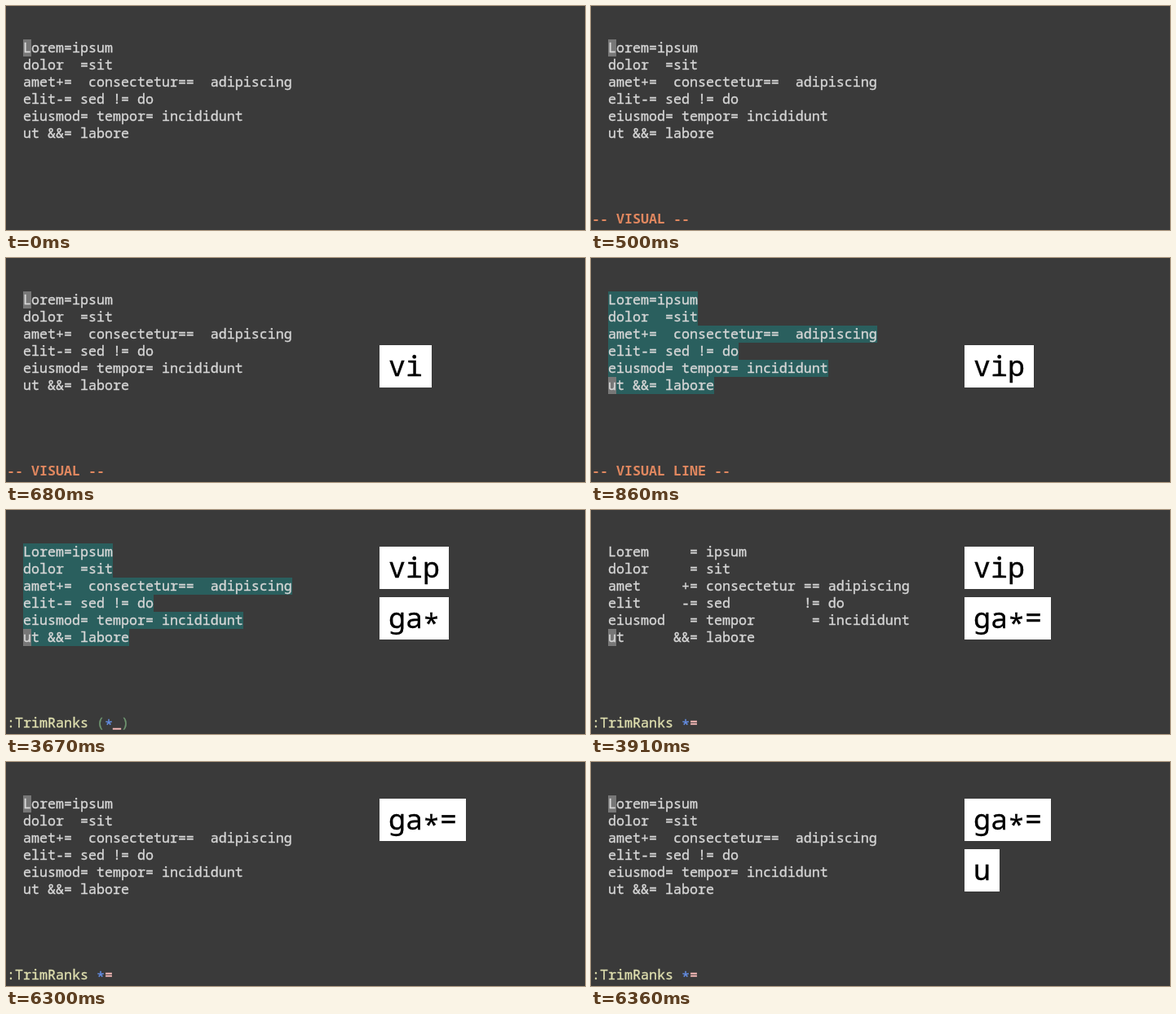
These frames come from a looping animation (710x275 px, 8 s). An HTML page:

```html
<!DOCTYPE html>
<html lang="en">
<head>
<meta charset="utf-8">
<title>Aligning text</title>
<style>
  html, body { margin: 0; width: 100%; height: 100%; overflow: hidden; background: #3a3a3a; }
  pre {
    position: absolute; margin: 0; color: #d6d6d6;
    font: 16.667px/21px "Noto Sans Mono", "DejaVu Sans Mono", monospace;
    font-variant-ligatures: none;
    -webkit-text-stroke: .35px;
  }
  #text { left: 21px; top: 40px; }
  #status { left: 1px; top: 250px; }
  .line { position: relative; isolation: isolate; display: block; width: max-content; height: 21px; }
  .line::before, .line::after { position: absolute; z-index: -1; left: 0; top: 1px; height: 21px; }
  .selected::before { content: ""; width: 100%; background: #2a5f5e; }
  .cursor::after { content: ""; width: 10px; background: #777; }
  .keys {
    left: 458px; height: 52px; padding: 0 11px; background: #fff; color: #000;
    font-size: 35px; line-height: 50px;
  }
  .star { position: relative; top: .2em; }
  .mode { color: #e0875f; font-weight: bold; -webkit-text-stroke: 0; }
  .command { color: #dfdfaf; }
  .paren { color: #719872; }
  .blue { color: #6590e8; }
  .pink { color: #ffbfbd; }
</style>
</head>
<body>
<pre id="text"></pre>
<pre id="status"></pre>
<pre class="keys" id="upper" style="top:45px"></pre>
<pre class="keys" id="lower" style="top:107px"></pre>
<script>
const $ = id => document.getElementById(id);
const span = (cls, s) => `<span class="${cls}">${s}</span>`;
const escapeHtml = s => s.replace(/&/g, "&amp;");

const raw = [
  "Lorem=ipsum",
  "dolor  =sit",
  "amet+=  consectetur==  adipiscing",
  "elit-= sed != do",
  "eiusmod= tempor= incididunt",
  "ut &&= labore"
];
const aligned = [
  "Lorem     = ipsum",
  "dolor     = sit",
  "amet     += consectetur == adipiscing",
  "elit     -= sed         != do",
  "eiusmod   = tempor       = incididunt",
  "ut      &&= labore"
];

const star = span("star", "*");
const command = args => span("command", ":TrimRanks ") + args;
const prompt = args => command(span("paren", "(") + args + span("paren", ")"));
const blank = span("pink", "_");
const mode = name => span("mode", `-- ${name} --`);

// Each step changes only the listed parts of the screen.
const steps = [
  [0, { lines: raw, cursor: 0, selected: false, status: "", upper: "", lower: "" }],
  [500, { status: mode("VISUAL") }],
  [560, { lower: "v" }],
  [680, { lower: "vi" }],
  [860, { lower: "vip", cursor: 5, selected: true, status: mode("VISUAL LINE") }],
  [3310, { upper: "vip", lower: "g" }],
  [3490, { lower: "ga", status: prompt(blank) }],
  [3670, { lower: "ga*", status: prompt(span("blue", star) + blank) }],
  [3910, { lower: "ga*=", lines: aligned, selected: false,
           status: command(span("blue", star) + span("pink", "=")) }],
  [6300, { lines: raw, cursor: 0, upper: "ga*=", lower: "" }],
  [6360, { lower: "u" }]
];

function showKeys(id, keys) {
  $(id).innerHTML = keys.replace("*", star);
  $(id).hidden = !keys;
}

function render(count) {
  const s = Object.assign({}, ...steps.slice(0, count).map(step => step[1]));
  $("text").innerHTML = s.lines.map((line, i) =>
    span("line" + (s.selected ? " selected" : "") + (i === s.cursor ? " cursor" : ""), escapeHtml(line))
  ).join("");
  $("status").innerHTML = s.status;
  showKeys("upper", s.upper);
  showKeys("lower", s.lower);
}

let shown = 0, start;
function tick(now) {
  start ??= now;
  const t = (now - start) % 8000;
  const count = steps.filter(step => step[0] <= t).length;
  if (count !== shown) render(shown = count);
  requestAnimationFrame(tick);
}
render(shown = 1);
requestAnimationFrame(tick);
</script>
</body>
</html>
```
